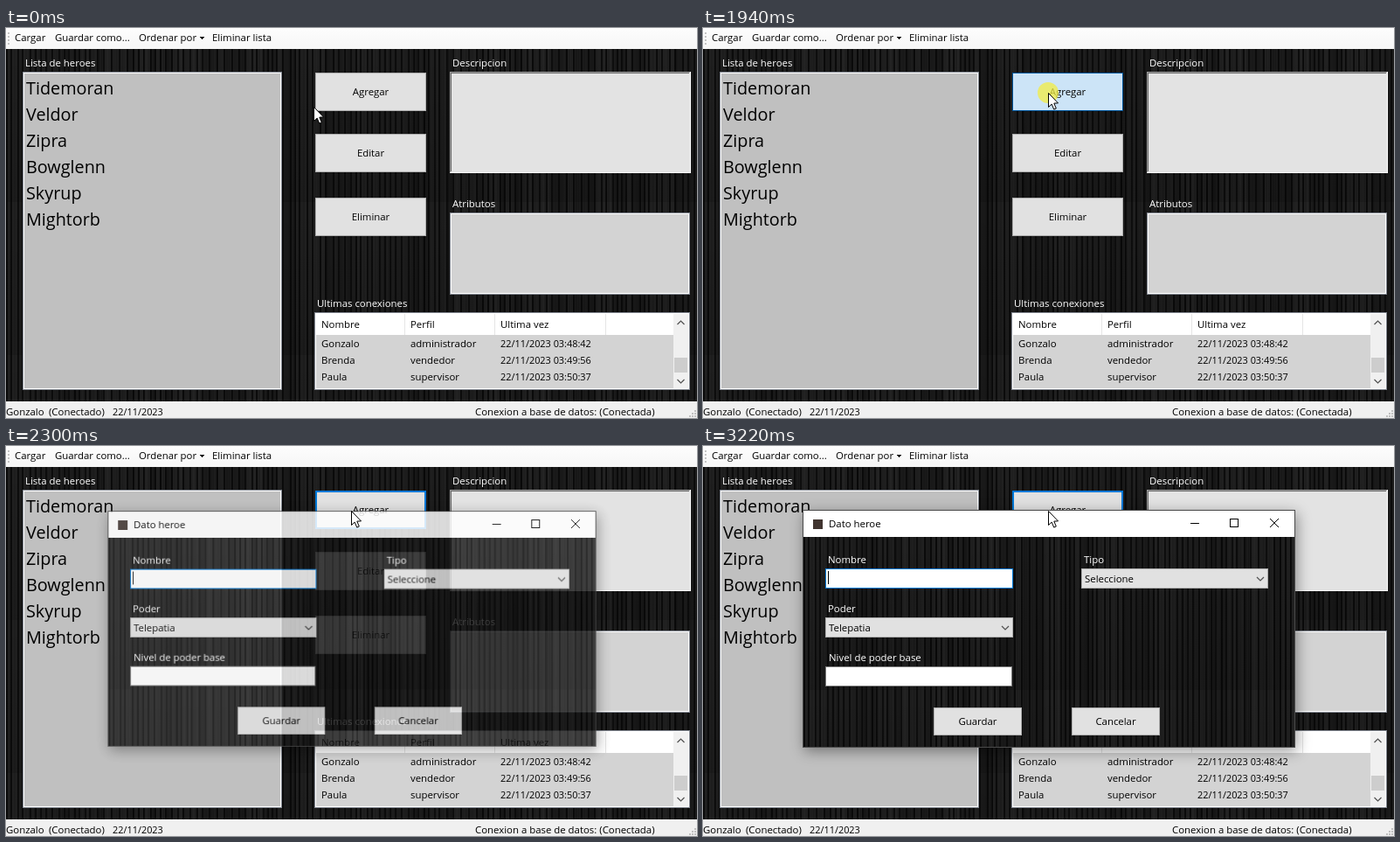
Recreate the animation shown at these times as an HTML page with a canvas. Size 791 by 446 pixels, loop 3350 ms.

```html
<!DOCTYPE html>
<html lang="es">
<head>
<meta charset="utf-8">
<title>Lista de heroes</title>
<style>
html, body { margin: 0; width: 100%; height: 100%; overflow: hidden; background: #111; }
canvas { display: block; }
</style>
</head>
<body>
<canvas id="stage" width="791" height="446"></canvas>
<script>
const W = 791, H = 446, LOOP = 3350;
const FONT = '"Open Sans", "Noto Sans", sans-serif';
const UI = 11.4, DATE = 10.9, BIG = 19.8;
const BLUE = '#0078d7';

const heroes = ['Tidemoran', 'Veldor', 'Zipra', 'Bowglenn', 'Skyrup', 'Mightorb'];
const logins = [
  ['Gonzalo', 'administrador', '22/11/2023 03:48:42'],
  ['Brenda', 'vendedor', '22/11/2023 03:49:56'],
  ['Paula', 'supervisor', '22/11/2023 03:50:37']
];

const stage = document.getElementById('stage').getContext('2d');

function layer(w, h) {
  const c = document.createElement('canvas');
  c.width = w;
  c.height = h;
  return c.getContext('2d');
}

function rect(g, x, y, w, h, fill) {
  g.fillStyle = fill;
  g.fillRect(x, y, w, h);
}

function box(g, x, y, w, h, fill, edge, line = 1) {
  rect(g, x, y, w, h, edge);
  rect(g, x + line, y + line, w - 2 * line, h - 2 * line, fill);
}

// Grey outline with a white inner line
function panel(g, x, y, w, h, fill) {
  rect(g, x, y, w, h, '#828790');
  box(g, x + 1, y + 1, w - 2, h - 2, fill, '#fff');
}

function text(g, s, x, y, color = '#000', size = UI, align = 'left') {
  g.font = size + 'px ' + FONT;
  g.textAlign = align;
  g.fillStyle = color;
  g.fillText(s, x, y);
}

function path(g, pts, color, width = 1) {
  g.beginPath();
  pts.forEach(([x, y]) => g.lineTo(x, y));
  g.strokeStyle = color;
  g.lineWidth = width;
  g.stroke();
}

function chevron(g, x, y, dir, color = '#505050') {
  path(g, [[x - 4, y - 2 * dir], [x, y + 2 * dir], [x + 4, y - 2 * dir]], color, 1.2);
}

function button(g, label, x, y, w, h) {
  box(g, x, y, w, h, '#e1e1e1', '#adadad');
  text(g, label, x + w / 2, y + h / 2 + 4, '#000', UI, 'center');
}

// Dark ribbed wall: narrow grooves between uneven grey ribs.
function makeRibs() {
  const w = 400, h = 175, g = layer(w, h);
  let seed = 7;
  const rnd = () => (seed = (seed * 16807) % 2147483647) / 2147483647;
  for (let x = 0; x < w;) {
    const width = 5 + Math.floor(rnd() * 5), tone = 20 + rnd() * 10;
    for (let i = 0; i < width; i++, x++) {
      const v = i < 2 ? 8 + rnd() * 6 : tone + rnd() * 7;
      rect(g, x, 0, 1, h, `rgb(${v},${v},${v})`);
    }
  }
  const shade = g.createLinearGradient(0, 0, 0, h);
  shade.addColorStop(0, 'rgba(0,0,0,0)');
  shade.addColorStop(1, 'rgba(0,0,0,.14)');
  rect(g, 0, 0, w, h, shade);
  return g.canvas;
}
const ribs = makeRibs();

function wall(g, x, y, w, h) {
  g.save();
  g.translate(x, y);
  rect(g, 0, 0, w, h, g.createPattern(ribs, 'repeat'));
  g.restore();
}

function makeMain() {
  const g = layer(W, H);
  wall(g, 0, 24, W, 403);

  const bar = g.createLinearGradient(0, 0, 0, 24);
  bar.addColorStop(0, '#fdfdfd');
  bar.addColorStop(1, '#f6f6f6');
  rect(g, 0, 0, W, 24, bar);
  for (let y = 5; y < 19; y += 4) rect(g, 2, y, 2, 2, '#c4c4c4');
  text(g, 'Cargar', 10, 15);
  text(g, 'Guardar como...', 56, 15);
  text(g, 'Ordenar por', 152, 15);
  text(g, 'Eliminar lista', 236, 15);
  for (let i = 0; i < 3; i++) rect(g, 222 + i, 10 + i, 5 - 2 * i, 1, '#000');

  text(g, 'Lista de heroes', 22, 44, '#fff');
  text(g, 'Descripcion', 511, 44, '#fff');
  text(g, 'Atributos', 511, 205, '#fff');
  text(g, 'Ultimas conexiones', 356, 319, '#fff');

  panel(g, 19, 50, 297, 364, '#c0c0c0');
  heroes.forEach((name, i) => text(g, name, 23, 76 + 30 * i, '#000', BIG));

  button(g, 'Editar', 354, 121, 127, 44);
  button(g, 'Eliminar', 354, 194, 127, 44);

  box(g, 508, 50, 276, 116, '#e3e3e3', '#fff');
  rect(g, 508, 50, 275, 1, '#a0a0a0');
  rect(g, 508, 50, 1, 115, '#a0a0a0');
  rect(g, 509, 51, 273, 1, '#696969');
  rect(g, 509, 51, 1, 113, '#696969');
  panel(g, 508, 211, 275, 94, '#d3d3d3');

  panel(g, 353, 325, 430, 89, '#d3d3d3');
  rect(g, 355, 327, 409, 24, '#fff');
  [456, 559, 686].forEach(x => rect(g, x, 327, 1, 24, '#e5e5e5'));
  ['Nombre', 'Perfil', 'Ultima vez'].forEach((s, i) => text(g, s, [361, 463, 566][i], 343));
  logins.forEach(([who, role, when], i) => {
    const y = 365 + 19 * i;
    text(g, who, 361, y);
    text(g, role, 463, y);
    text(g, when, 566, y, '#000', DATE);
  });
  rect(g, 764, 327, 17, 85, '#f0f0f0');
  rect(g, 765, 377, 15, 17, '#cdcdcd');
  chevron(g, 772.5, 337, -1);
  chevron(g, 772.5, 404, 1);

  rect(g, 0, 427, W, 19, '#f0f0f0');
  text(g, 'Gonzalo', 0, 443);
  text(g, '(Conectado)', 49, 443);
  text(g, '22/11/2023', 122, 443, '#000', DATE);
  text(g, 'Conexion a base de datos: (Conectada)', 537, 443);
  for (let r = 0; r < 3; r++)
    for (let c = 0; c <= r; c++) rect(g, 788 - 3 * c, 437 + 3 * r, 2, 2, '#bfbfbf');
  return g.canvas;
}

function combo(g, label, x, y, w) {
  box(g, x, y, w, 23, '#e1e1e1', '#adadad');
  text(g, label, x + 4, y + 16);
  chevron(g, x + w - 9, y + 12, 1);
}

function makeDialog() {
  const g = layer(W, H);
  g.save();
  g.shadowColor = 'rgba(0,0,0,.4)';
  g.shadowBlur = 15;
  g.shadowOffsetX = 2;
  g.shadowOffsetY = 4;
  rect(g, 114, 73, 564, 272, '#4a4a4a');
  g.restore();
  rect(g, 115, 74, 562, 30, '#fff');
  wall(g, 115, 104, 562, 240);

  rect(g, 126, 84, 11, 11, '#40342f');
  text(g, 'Dato heroe', 144, 93);
  rect(g, 558, 88, 10, 1, '#000');
  g.strokeStyle = '#000';
  g.lineWidth = 1;
  g.strokeRect(603.5, 83.5, 9, 9);
  path(g, [[649, 83], [659, 93]], '#000');
  path(g, [[659, 83], [649, 93]], '#000');

  text(g, 'Nombre', 143, 134, '#fff');
  text(g, 'Tipo', 436, 134, '#fff');
  text(g, 'Poder', 143, 190, '#fff');
  text(g, 'Nivel de poder base', 144, 246, '#fff');
  box(g, 140, 140, 215, 23, '#fff', BLUE);
  box(g, 140, 252, 214, 23, '#fff', '#7a7a7a');
  combo(g, 'Telepatia', 140, 196, 215);
  combo(g, 'Seleccione', 433, 140, 214);
  button(g, 'Guardar', 264, 299, 101, 32);
  button(g, 'Cancelar', 422, 299, 101, 32);
  return g.canvas;
}

const clamp = v => Math.max(0, Math.min(1, v));
const span = (t, a, b) => clamp((t - a) / (b - a));
const smooth = p => p * p * (3 - 2 * p);

// Pointer moves: [start, end, dx, dy]
const moves = [
  [30, 570, 22, -19],
  [580, 760, 12, 6],
  [920, 1100, 9, -3]
];

function pointerAt(t) {
  let x = 352, y = 90;
  for (const [a, b, dx, dy] of moves) {
    const p = smooth(span(t, a, b));
    x += dx * p;
    y += dy * p;
  }
  return [Math.round(x), Math.round(y)];
}

function addButton(g, t) {
  const put = (fill, edge, line, alpha) => {
    g.globalAlpha = alpha;
    box(g, 354, 51, 127, 44, fill, edge, line);
    g.globalAlpha = 1;
  };
  put('#e1e1e1', '#adadad', 1, 1);
  if (t >= 1940 && t < 2060) put('#cce4f7', '#005499', 1, 1);
  else if (t < 1940) put('#e5f1fb', BLUE, 1, span(t, 110, 260));
  else {
    put('#cce4f7', BLUE, 2, 1);
    put('#e1e1e1', BLUE, 2, span(t, 2050, 2230));
  }
  text(g, 'Agregar', 417.5, 77, '#000', UI, 'center');
}

function pointer(g, x, y) {
  g.save();
  g.translate(x + 0.5, y + 0.5);
  g.beginPath();
  [[0, 0], [0, 16], [3.7, 12.6], [6.2, 18.6], [8.8, 17.5], [6.3, 11.6], [11, 11.4]]
    .forEach(([px, py]) => g.lineTo(px, py));
  g.closePath();
  g.fillStyle = '#fff';
  g.fill();
  g.strokeStyle = '#000';
  g.lineWidth = 1;
  g.lineJoin = 'round';
  g.stroke();
  g.restore();
}

const mainView = makeMain();
const dialog = makeDialog();

function showDialog(g, t) {
  const alpha = span(t, 2055, 2348);
  if (!alpha) return;
  const scale = 1 - 0.072 * (1 - span(t, 2060, 2425)) ** 2;
  g.save();
  g.globalAlpha = alpha;
  g.translate(396, 209);
  g.scale(scale, scale);
  g.translate(-396, -209);
  g.drawImage(dialog, 0, 0);
  if (t >= 2200 && (t < 2680 || t >= 3220)) rect(g, 143, 143, 1, 15, '#000');
  g.restore();
}

function draw(t) {
  const g = stage;
  g.drawImage(mainView, 0, 0);
  addButton(g, t);
  showDialog(g, t);
  if (t >= 1940 && t < 2060) {
    g.beginPath();
    g.arc(395, 74, 12, 0, 7);
    g.fillStyle = 'rgba(242,236,70,.76)';
    g.fill();
  }
  pointer(g, ...pointerAt(t));
}

function tick() {
  draw(performance.now() % LOOP);
  requestAnimationFrame(tick);
}
tick();
</script>
</body>
</html>
```
